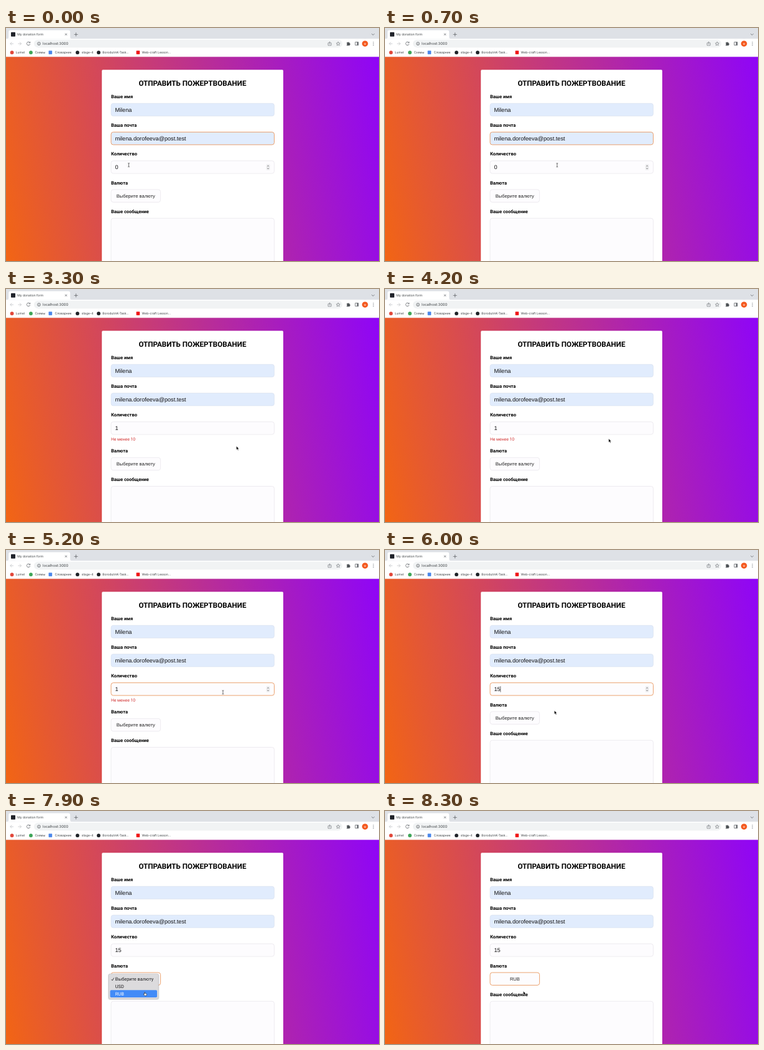
An HTML page for the animation above (8400 ms loop, 600 px wide and 375 px high).

```html
<!DOCTYPE html>
<html lang="ru">
<head>
<meta charset="utf-8">
<title>My donation form</title>
<style>
  html, body { margin: 0; width: 100%; height: 100%; overflow: hidden; }
  svg { display: block; width: 600px; height: 375px; text-rendering: geometricPrecision; }
  .page { width: 600px; height: 329px; background: linear-gradient(80deg, #f26514, #8f05f7); }
  .ui { font: 5px Inter, Roboto, sans-serif; fill: #3c4043; }
  .icon { fill: none; stroke: #5f6368; stroke-width: .8; }
  .label { font: bold 7.5px Roboto, sans-serif; }
  .value { font: 9.17px "Liberation Sans", Arial, sans-serif; fill: #111; }
  .select { font: 7.5px "Liberation Sans", Arial, sans-serif; fill: #222; text-anchor: middle; }
  .menu { font: 7.4px Roboto, sans-serif; fill: #1c1c1e; }
  .box { fill: #fdfcfe; stroke: #e2e0e6; stroke-width: .6; }
  .filled { fill: #e1ecfd; stroke: #d5deec; }
  .focus { stroke: #e9985f; stroke-width: .9; }
</style>
</head>
<body>
<svg viewBox="0 0 600 375">
  <!-- page -->
  <foreignObject y="46" width="600" height="329"><div class="page"></div></foreignObject>
  <rect x="154.2" y="67.2" width="291.8" height="320" rx="1.7" fill="#fff"/>
  <text x="300" y="92.6" text-anchor="middle" style="font: bold 11.67px Roboto, sans-serif">ОТПРАВИТЬ ПОЖЕРТВОВАНИЕ</text>

  <g class="label">
    <text x="169" y="112.8">Ваше имя</text>
    <text x="169" y="159">Ваша почта</text>
    <text x="169" y="205.3">Количество</text>
  </g>
  <rect class="box filled" x="169" y="121.3" width="262.5" height="20.4" rx="3.6"/>
  <rect id="mail" class="box filled" x="169" y="167.5" width="262.5" height="20.4" rx="3.6"/>
  <rect id="amount" class="box" x="169" y="213.7" width="262.5" height="20.4" rx="3.6"/>
  <g class="value">
    <text x="175.4" y="134.7">Milena</text>
    <text x="175.4" y="180.9">milena.dorofeeva@post.test</text>
    <text id="count" x="175.4" y="227.1"></text>
  </g>
  <path id="caret" d="M0 219.2v9.6" stroke="#111" stroke-width=".6"/>
  <g id="spinner">
    <rect id="knob" x="418.6" y="219" width="6" height="10" rx="1.6"/>
    <path d="M420.3 222.8l1.3-1.4 1.3 1.4M420.3 225.4l1.3 1.4 1.3-1.4" fill="none" stroke="#444" stroke-width=".75"/>
  </g>
  <text id="error" x="169" y="243.8" fill="#cf2a2a" style="font: 6.75px Roboto, sans-serif">Не менее 10</text>

  <g id="lower">
    <text class="label" x="169" y="251.6">Валюта</text>
    <rect id="currency" class="box" x="169" y="260" width="79.6" height="20.4" rx="3.6"/>
    <text id="choice" class="select" x="208.8" y="272.9"></text>
    <text class="label" x="169" y="297.9">Ваше сообщение</text>
    <rect class="box" x="169" y="306.2" width="262.5" height="90" rx="3.6"/>
  </g>

  <g id="menu" class="menu">
    <rect x="164" y="262" width="82.4" height="42" rx="3.4" fill="#000" opacity=".12"/>
    <rect x="165.2" y="262" width="80" height="40.3" rx="2.6" fill="#dcdbdd" stroke="#b9b8bb" stroke-width=".5"/>
    <rect id="bar" x="167.5" width="75.5" height="11.8" rx="1.7" fill="#428bf7"/>
    <path id="tick" d="M169.6 271l1.5 1.8 2.5-4.2" fill="none" stroke-width=".8"/>
    <text x="175.8" y="273.3">Выберите валюту</text>
    <text x="175.8" y="285.1">USD</text>
    <text x="175.8" y="296.9">RUB</text>
  </g>

  <!-- browser -->
  <rect width="600" height="46.4" fill="#fff"/>
  <rect width="600" height="17.3" fill="#dee1e6"/>
  <path d="M1.5 17.3q2.7 0 2.7-2.7V6.4q0-3 3-3h93q3 0 3 3v8.2q0 2.7 2.7 2.7z" fill="#fff"/>
  <rect x="8" y="6.8" width="7" height="7" rx=".8" fill="#20232a"/>
  <rect x="45" y="19" width="496" height="12.4" rx="6.2" fill="#f1f3f4"/>
  <g class="icon">
    <path d="M95 8.8l3 3m0-3l-3 3M109.6 10.4h6M112.6 7.4v6M588.2 9.2l2.2 2.2 2.2-2.2"/>
    <path d="M12 25.2H6.8m2.5-2.5l-2.5 2.5 2.5 2.5M19.4 25.2h5.2m-2.5-2.5l2.5 2.5-2.5 2.5" stroke="#c2c4c7"/>
    <path d="M38.2 23.4a2.7 2.7 0 1 0 .5 2.4M38.8 22v1.9h-1.9"/>
    <circle cx="53" cy="25.2" r="2.4"/>
    <path d="M53 24.9v1.6m0-2.8v.6"/>
    <path d="M519.6 24h-1.5v4h5v-4h-1.5M520.6 26.4v-4.2m-1.4 1.4l1.4-1.4 1.4 1.4" stroke-width=".6"/>
    <path d="M534.3 22.2l.9 2 2.1.2-1.6 1.5.5 2.1-1.9-1.1-1.9 1.1.5-2.1-1.6-1.5 2.1-.2z" stroke-width=".6"/>
    <path d="M561.8 22.7h5v5h-5z"/>
    <path d="M565.6 22.7v5" stroke-width="2"/>
  </g>
  <path d="M548 23.4h1.4a1 1 0 0 1 2 0h1.5v1.5a1 1 0 0 1 0 2v1.3H548v-1.5a.9.9 0 0 0 0-1.8z" fill="#4d5155"/>
  <circle cx="577.5" cy="25.2" r="4.8" fill="#f4591f"/>
  <text x="577.5" y="26.7" text-anchor="middle" fill="#fff" style="font: 4px Roboto, sans-serif">M</text>
  <path d="M591 22.8v.01m0 2.4v.01m0 2.4v.01" stroke="#5f6368" stroke-width="1.2" stroke-linecap="round"/>
  <circle cx="9.6" cy="39.4" r="2.9" fill="#e1483a"/>
  <circle cx="40" cy="39.4" r="2.9" fill="#3fa558"/>
  <rect x="68.6" y="36.6" width="5.6" height="5.6" rx=".6" fill="#4b87ea"/>
  <circle cx="115" cy="39.4" r="2.9" fill="#1f2328"/>
  <circle cx="149" cy="39.4" r="2.9" fill="#1f2328"/>
  <rect x="209.6" y="36.6" width="5.6" height="5.6" rx=".6" fill="#f01818"/>
  <g class="ui">
    <text x="18.3" y="12.2">My donation form</text>
    <text x="59" y="27.3" font-size="5.83" style="font-size: 5.83px">localhost:3000</text>
    <text x="15.8" y="41.2">Lumel</text>
    <text x="46.4" y="41.2">Схемы</text>
    <text x="78.6" y="41.2">Словарник</text>
    <text x="121.8" y="41.2">stage-4</text>
    <text x="155.2" y="41.2">BorodulinK-Task...</text>
    <text x="218.6" y="41.2">Web-craft Lesson...</text>
  </g>

  <!-- pointers, each with its hot spot at 0,0 -->
  <path id="arrow" d="M0 0v5.8l1.4-1.2 1 2.2 1-.4-1-2.2h1.8z" fill="#000" stroke="#fff" stroke-width=".4"/>
  <path id="beam" d="M-1.3-3.1q1.3 0 1.3.8 0-.8 1.3-.8M0-2.4v4.8M-1.3 3.1q1.3 0 1.3-.8 0 .8 1.3.8" fill="none" stroke="#222" stroke-width=".65"/>
  <path id="hand" d="M-.9-2.5q.6-.7 1 0v1.6l2 .5q.8.3.7 1.1l-.5 2.3h-2.8l-1.8-2.3q-.1-.9.8-.5l.6.5z" fill="#fff" stroke="#111" stroke-width=".55"/>
</svg>
<script>
const LOOP = 8400, STEP = 100;
const PATH = [
  [0, 197.5, 220.5], [300, 197.5, 220.5], [1300, 423, 221], [2150, 423, 221],
  [2900, 370.6, 253], [3900, 370.6, 253], [4500, 349, 229], [5500, 349, 229],
  [6300, 237, 272], [6600, 236.5, 274.5], [6900, 236.5, 274.5], [7500, 223.5, 294.3],
  [8000, 223.5, 294.3], [8300, 222.5, 290], [8400, 222.5, 290]
];
const $ = id => document.getElementById(id);
const show = (id, on) => $(id).setAttribute('visibility', on ? 'visible' : 'hidden');
const focus = (id, on) => $(id).classList.toggle('focus', on);
const within = (v, from, to) => v >= from && v < to;

function pointer(t) {
  const i = PATH.findIndex(p => p[0] > t);
  const [t0, x0, y0] = PATH[i - 1], [t1, x1, y1] = PATH[i];
  const u = (t - t0) / (t1 - t0), k = u * u * (3 - 2 * u);
  return [x0 + (x1 - x0) * k, y0 + (y1 - y0) * k];
}

function draw(t) {
  const [x, y] = pointer(t);
  const error = within(t, 3200, 5600);
  const open = within(t, 6500, 8000);
  const editing = within(t, 1650, 3200) || within(t, 4500, 6400);
  const inAmount = within(x, 169, 432) && within(y, 213, 235);
  const inSelect = within(x, 169, 249) && within(y, 260, 281);

  focus('mail', t < 1650);
  focus('amount', editing);
  focus('currency', t >= 6400);

  const count = t < 1900 ? '0' : t < 5600 ? '1' : '15';
  $('count').textContent = count;
  const typed = t < 4500 ? 1650 : t < 5600 ? 4500 : 5600;
  show('caret', editing && (t - typed) % 1000 < 500);
  $('caret').setAttribute('transform', `translate(${175.6 + 5.1 * count.length})`);
  show('spinner', inAmount || editing);
  $('knob').setAttribute('fill', within(t, 1600, 1900) ? '#c9c9cd' : '#efeff1');

  show('error', error);
  $('lower').setAttribute('transform', `translate(0 ${error ? 11.3 : 0})`);
  $('choice').textContent = t < 8000 ? 'Выберите валюту' : 'RUB';

  const row = Math.max(0, Math.min(2, Math.floor((y - 264.6) / 11.8)));
  show('menu', open);
  $('bar').setAttribute('y', 264.6 + 11.8 * row);
  document.querySelectorAll('#menu text').forEach((e, i) => e.style.fill = i === row ? '#fff' : '');
  $('tick').setAttribute('stroke', row ? '#1c1c1e' : '#fff');

  const shape = open || inSelect ? 'hand' : inAmount && x < 418 ? 'beam' : 'arrow';
  for (const id of ['arrow', 'beam', 'hand']) show(id, id === shape);
  $(shape).setAttribute('transform', `translate(${x} ${y})`);
}

function tick() {
  draw(Math.floor(performance.now() % LOOP / STEP) * STEP);
  requestAnimationFrame(tick);
}
tick();
</script>
</body>
</html>
```
